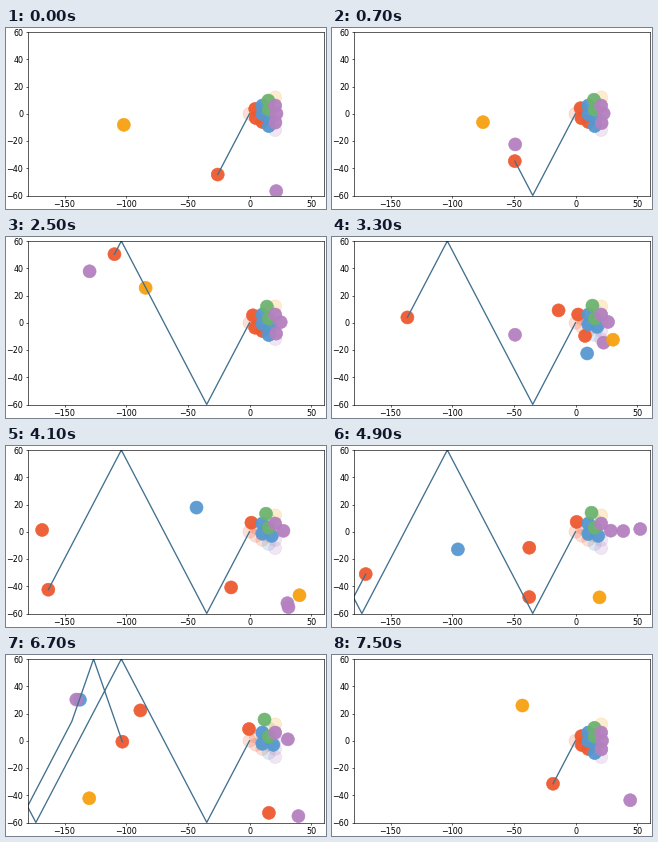
A matplotlib script for the animation above (7600 ms loop, 320 by 181 pixels).

```python
import numpy as np
import matplotlib.pyplot as plt
from matplotlib.animation import FuncAnimation
from matplotlib.lines import Line2D

W, H, DPI = 320, 181, 100
FRAMES = 76
RESTART = 70            # first frame of the new break
LOW, HIGH = np.array([-180, -60]), np.array([60, 60])

RED, BLUE, GREEN = "#ee5a30", "#5698d0", "#6db36f"
PURPLE, ORANGE, TRACE = "#b480bf", "#f6a00f", "#41708f"
COLORS = [RED] * 4 + [BLUE] * 4 + [GREEN] * 2 + [PURPLE] * 4 + [ORANGE]

RACK = [(5.2 * row, 3 * (2 * k - row)) for row in range(5) for k in range(row + 1)]


def polar(speed, degrees):
    a = np.radians(degrees)
    return speed * np.cos(a), speed * np.sin(a)


# Each collision: time and the new velocity of the balls it touches.
# The break throws the three corners out; the rest of the rack drifts.
COLLISIONS = [
    (0, {0: polar(6.7, 240), 10: polar(11.64, -30), 14: polar(30.2, 30),
         1: (-.02, -.02), 2: (-.075, .075), 4: (0, -.03), 7: (.05, 0),
         9: (-.046, .088), 11: (.025, -.06), 12: (.138, .014)}),
    (39.4, {14: (1.27, -4.27)}),
    (39.75, {1: (-19.3, 13.7), 3: (-2.83, -3.9), 6: (-6.55, -14.4), 11: (1, -6.62)}),
    (49.6, {10: (1.65, 8.65), 14: (8.3, .33)}),
    (62.3, {1: (-2.7, -8.7), 10: (-1.5, -9.3), 11: (-21.3, -.6)}),
    (64.4, {0: (4, 10.4), 6: (-7.45, 8.35)}),
]


def bounce(p):
    """Reflect straight-line positions at the cushions."""
    size = HIGH - LOW
    return HIGH - np.abs((p - LOW) % (2 * size) - size)


# Per ball: start time, start point and velocity of each straight run
runs = [[(0, np.array(p), np.zeros(2))] for p in RACK]


def position(i, t):
    starts, points, speeds = map(np.array, zip(*runs[i]))
    t = np.atleast_1d(t)
    k = np.searchsorted(starts, t, side="right") - 1
    return bounce(points[k] + speeds[k] * (t - starts[k])[:, None])


for time, hits in COLLISIONS:
    for ball, velocity in hits.items():
        runs[ball].append((time, position(ball, time)[0], np.array(velocity)))


def clock(frame):
    return frame + 7.69 if frame < RESTART else frame - 69.56


fig = plt.figure(figsize=(W / DPI, H / DPI), dpi=DPI, facecolor="white")
ax = fig.add_axes([21.5 / W, 13.5 / H, 296 / W, 163.5 / H])
ax.set(xlim=(LOW[0], HIGH[0]), ylim=(LOW[1], HIGH[1]),
       xticks=range(-150, 51, 50), yticks=range(-60, 61, 20))
ax.tick_params(labelsize=5.8, length=1.6, width=.45, pad=1.4)
for spine in ax.spines.values():
    spine.set_linewidth(.45)
fig.add_artist(Line2D([0, 1], [.5 / H] * 2, color="black", lw=.72))

style = dict(s=88, c=COLORS, linewidths=.4)
ax.scatter(*zip(*RACK), alpha=.2, **style)
balls = ax.scatter(*zip(*RACK), alpha=.95, **style)
trace, = ax.plot([], [], color=TRACE, lw=.95)


def draw(frame):
    t = clock(frame)
    balls.set_offsets([position(i, t)[0] for i in range(len(RACK))])
    trace.set_data(*position(0, np.append(np.arange(0, t, .05), t)).T)
    return balls, trace


anim = FuncAnimation(fig, draw, frames=FRAMES, interval=100, repeat=True, repeat_delay=0)
plt.show()
```
